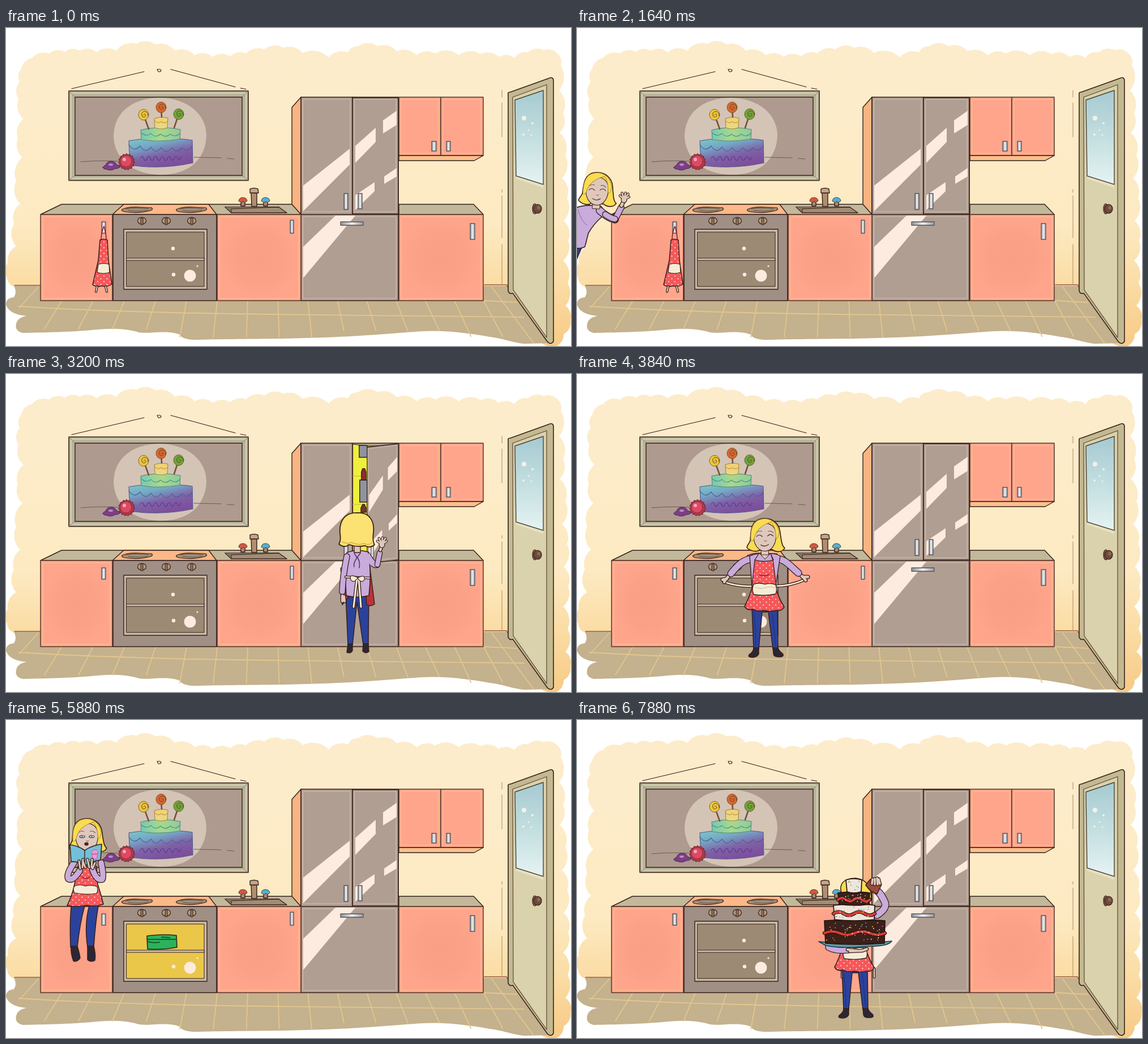
Recreate the animation shown at these times as an HTML page. Size 998 by 561 pixels, loop 8 s.

```html
<!DOCTYPE html>
<html lang="en">
<head>
<meta charset="utf-8">
<title>Kitchen</title>
<style>
html,body{margin:0;width:100%;height:100%;overflow:hidden;background:#fff}
svg{display:block;width:100vw;height:100vh}
</style>
</head>
<body>
<svg id="stage" viewBox="0 0 998 561" stroke-linecap="round" stroke-linejoin="round"></svg>
<script>
const INK = '#38201a', SKIN = '#dfc8bb', LILAC = '#c9abdc', HAIR = '#f9dc50', BLUE = '#2b429c',
  SALMON = '#ffa58c', CREAM = '#f6ecd6', SHINE = '#fdebdf', RED = '#f5585a', SHOE = '#2d2634';

let seed = 7;
const rnd = () => (seed = seed * 16807 % 2147483647) / 2147483647;

// drawing helpers, all return markup
const path = (d, fill = 'none', ink = INK, w = 1.4) =>
  `<path d="${d}" fill="${fill}" stroke="${ink}" stroke-width="${w}"/>`;
const flat = (d, fill) => path(d, fill, 'none', 0);
const oval = (x, y, rx, ry, fill, ink = INK, w = 1.2) =>
  `<ellipse cx="${x}" cy="${y}" rx="${rx}" ry="${ry}" fill="${fill}" stroke="${ink}" stroke-width="${w}"/>`;
const dot = (x, y, r, fill) => oval(x, y, r, r, fill, 'none', 0);
const box = (x1, y1, x2, y2, fill, ink = INK, w = 1.4) =>
  path(`M${x1},${y1}H${x2}V${y2}H${x1}Z`, fill, ink, w);
const limb = (d, color, w) => path(d, 'none', INK, w + 2.6) + path(d, 'none', color, w);
const group = (id, body, hidden) => `<g id="${id}"${hidden ? ' display="none"' : ''}>${body}</g>`;
const at = (x, y, body, more = '') => `<g transform="translate(${x} ${y}) ${more}">${body}</g>`;

function scallop(text) {
  const pts = text.split(' ').map(p => p.split(',').map(Number));
  return pts.map(([x, y], i) => {
    if (!i) return `M${x},${y}`;
    const r = 0.85 * Math.hypot(x - pts[i - 1][0], y - pts[i - 1][1]);
    return `A${r},${r} 0 0 1 ${x},${y}`;
  }).join('') + 'Z';
}

function speckle(n, x1, y1, x2, y2) {
  const colors = ['#e8d34c', '#5fb0d8', '#e46a9c', '#7cc46a', '#f0efe8', '#e07a3a'];
  let s = '';
  for (let i = 0; i < n; i++)
    s += dot(x1 + rnd() * (x2 - x1), y1 + rnd() * (y2 - y1), 1, colors[i % 6]);
  return s;
}

const linear = (id, x2, y2, ...stops) =>
  `<linearGradient id="${id}" x2="${x2}" y2="${y2}">` +
  stops.map((c, i) => `<stop offset="${i / (stops.length - 1)}" stop-color="${c}"/>`).join('') + '</linearGradient>';

const defs = `<defs>
${linear('wall', 0, 1, '#fdeccb', '#fdecca', '#fdebc6', '#fdeac2', '#fbdca4', '#f7ca86')}
${linear('glass', 0, 1, '#a5cad2', '#c3dedf', '#e6f3f3')}
${linear('steel', 1, 0, '#8f9196', '#f1f1f4', '#9a9ca1')}
${linear('rain1', .5, 1, '#7ccbc2', '#74a9c6', '#7f62a6', '#7d4f9c')}
${linear('rain2', 1, 0, '#75c9b4', '#a8d88d', '#8ecb9d')}
${linear('rain3', 0, 1, '#f1cf73', '#e6dc86')}
<radialGradient id="cab"><stop stop-color="#f99f86"/><stop offset=".6" stop-color="#fba188"/><stop offset="1" stop-color="${SALMON}"/></radialGradient>
<pattern id="dots" width="11" height="10" patternUnits="userSpaceOnUse"><rect width="11" height="10" fill="${RED}"/>
<circle cx="2.5" cy="2.5" r="1" fill="#fff"/><circle cx="8" cy="7.5" r="1" fill="#fff"/></pattern></defs>`;

function room() {
  let s = flat(scallop('14,456 2,440 3,415 18,385 14,345 25,310 18,270 29,228 21,195 31,160 22,125 24,95 27,72 46,53 76,45 104,42 130,40 160,43 195,40 230,28 264,29 298,40 333,48 365,51 396,50 424,45 456,38 490,35 524,44 570,52 604,43 622,32 656,32 690,41 725,48 758,45 800,48 838,46 870,51 898,53 922,43 950,39 973,44 980,66 977,110 984,150 978,185 988,225 982,265 991,300 985,340 993,375 984,410 992,450 988,490 997,515 985,540 972,561 930,540'), 'url(#wall)');
  s += flat('M14,455H885L893,468L958,556L915,557C890,554 880,548 855,545C810,537 770,533 735,535C690,538 640,543 560,546C480,549 400,548 340,550Q312,551 307,541C285,532 255,540 235,537C210,530 190,530 160,532C110,537 60,537 30,538Q15,535 18,522Q20,511 36,508Q5,505 0,488Q0,476 14,475Q20,466 14,455Z', '#c4b18d');
  let tiles = 'M22,491Q200,502 460,505T915,510M845,481L902,484M57,457L24,493M858,457L932,556';
  for (let i = 0; i < 15; i++) {
    const x = 98 + i * 53.5 + 8 * Math.sin(i / 4), u = (x - 490) / 400;
    tiles += `M${x},482L${x + u * 34 + 3},${i < 4 ? 531 : i < 9 ? 545 : i < 13 ? 534 : 544}`;
  }
  s += path(tiles, 'none', '#e2c68e', 1.8);
  s += path('M15,454H61M845,453H884L890,462', 'none', '#9c5a38', 1.5);
  s += path('M876,110V122M876,132V192M876,285V290M876,296V370M876,382V452', 'none', '#a98a66', 1);
  return s;
}

function outerDoor() {
  return path('M887,117Q886,113 891,113L958,89Q966,85 967,92V553Q962,560 956,553L895,468Q889,470 887,464Z', '#c3b991', INK, 1.6) +
    path('M895,122L955,100V546L896,462Z', '#dad1ad', '#5b4632', 1.2) +
    path('M899,127L949,110V276L901,261Z', 'url(#glass)', '#4a4438', 1.4) +
    flat('M901,262L949,277V282L901,266Z', '#e8e0c0') +
    [[915, 159, 4.2], [930, 168, 2], [923, 180, 1.5], [914, 188, 2], [928, 189, 1.5]].map(([x, y, r]) => dot(x, y, r, '#f3f0e6')).join('') +
    oval(934, 319, 4, 9, '#8b6a52') + oval(939, 319, 7, 8, '#6e4a3b') + oval(941, 317, 3, 3.5, '#8c6653', 'none');
}

function cabinet(x1, y1, x2, y2, fill = 'url(#cab)') {
  return box(x1, y1, x2, y2, SALMON, '#5a352a', 1.5) + box(x1 + 4, y1 + 4, x2 - 4, y2 - 4, fill, '#fdba90', 1.6);
}
const handle = (x1, y1, x2, y2) => box(x1, y1, x2, y2, 'url(#steel)', '#55565c', 1.3);

function frame() {
  let s = path('M116,107L244,77M291,73L405,104M414,106L424,108M267,73q7,-1 7,2q-1,3 -5,2z', 'none', INK, 1.2);
  s += box(111, 111, 428, 269, '#b7b397', INK, 1.6) + box(115, 115, 424, 265, 'none', '#d0ccb0', 2.5) +
    path('M111,111L122,122M428,111L417,122M111,269L122,260M428,269L417,260', 'none', '#8b856a', 1) +
    box(122, 122, 417, 260, '#ae9a8f', INK, 1.4);
  s += path('M190,192C190,150 222,124 270,123C320,123 354,152 354,190C352,236 318,260 270,259C222,257 192,230 190,192Z', '#d4c4b6', 'none', 0);
  s += path('M132,236Q165,233 198,235M332,228L380,229M391,230L403,231', 'none', '#6f5c55', 1.1);
  s += path('M217,199Q272,190 329,198L330,238Q275,250 219,242Z', 'url(#rain1)', '#55588e', 1.1);
  s += path('M217,206q9,14 20,2q9,15 19,2q9,14 18,1q9,14 19,0q8,12 18,0q8,10 18,-2', 'none', '#4a5f94', 1.2);
  s += path('M237,230q4,-7 6,0q3,8 6,0q4,-7 6,0q3,8 6,0q4,-7 6,0q3,8 6,0q4,-7 6,0q3,8 6,0q4,-7 6,0q3,7 6,0q4,-7 6,0q3,6 6,-3', 'none', '#5a3a8e', 1.2);
  s += path('M238,180Q272,172 308,179L307,196Q272,202 239,197Z', 'url(#rain2)', '#5d8a72', 1.1);
  s += path('M239,185q9,8 17,1q8,9 17,1q9,8 17,0q9,7 17,-1', 'none', '#4d9180', 1.1);
  s += path('M262,160Q274,155 286,159L285,176Q273,180 263,176Z', 'url(#rain3)', '#a78448', 1.1) +
    path('M263,164q6,6 11,1q6,5 11,0', 'none', '#b8862f', 1);
  for (const [x, y, c, dx, dy] of [[243, 153, '#ecc63a', 9, 25], [274, 140, '#d8662f', 1, 17], [305, 152, '#6da53a', -8, 24]])
    s += path(`M${x},${y}l${dx},${dy}`, 'none', '#7a5136', 2.6) + oval(x, y, 9, 9.5, c, '#6a4b25', .8) +
      path(`M${x},${y}q3,-3 4,1q-2,5 -6,2q-4,-6 3,-9q8,1 7,8`, 'none', '#664820', 1);
  s += path('M171,246q3,-4 5,-4q2,-7 10,-7q8,1 9,6q5,1 7,4q-5,4 -9,3q-8,5 -16,1q-4,1 -6,-3z', '#7c3f86', '#4d2754', 1) + oval(185, 241, 4, 2, '#b98cc2', 'none');
  let frill = 'M';
  for (let i = 0; i <= 60; i++) {
    const a = i / 60 * 6.2832, r = 13.5 + Math.sin(a * 15);
    frill += `${213 + r * Math.cos(a)},${236 + r * Math.sin(a)} `;
  }
  return s + path(frill + 'Z', '#b03a48', '#5e1c28', 1) + oval(212, 235, 10, 10, '#dc4a63', '#8a2438', .8) + dot(209, 232, 3, '#f4a9b5');
}

function units() {
  let s = path('M505,140L521,122V329L505,312Z', '#f8b482') + box(521, 122, 693, 481, '#b09e92', INK, 1.6);
  s += path('M525,126H608V324H525Z', 'none', '#d0c0b5', 1) + path('M525,333H689V477H525Z', 'none', '#d0c0b5', 1);
  s += flat('M525,278L607,213V241L525,323Z M582,331H617L525,441V386Z', SHINE);
  s += path('M612,122V329M521,329H693', 'none', INK, 1.6) + handle(597, 292, 604, 320) + handle(591, 342, 631, 348);
  s += cabinet(694, 122, 768, 225, SALMON) + cabinet(768, 122, 843, 225, SALMON) + path('M694,225H843L827,234H694Z', '#fbbf8c') +
    handle(752, 200, 760, 217) + handle(778, 200, 785, 217);
  s += path('M694,311H826L843,329H694Z', '#c2b99b') + cabinet(694, 329, 843, 481) + handle(820, 345, 828, 373);
  s += path('M61,329L98,311H505L521,329Z', '#c2b99b') + path('M188,329L208,311H358L372,329Z', '#fcb887');
  s += cabinet(61, 329, 188, 481) + cabinet(373, 329, 521, 481) + handle(502, 339, 508, 362) + handle(169, 342, 176, 362);
  s += path('M387,316H482L496,326H398Z', '#a08d74') + path('M387,316L398,326V319L482,316', '#857460', INK, 1);
  s += path('M433,291H443V315H434Z', '#b08e72') + path('M431,284q7,-3 14,0l1,7h-15z', '#c5a488');
  for (const [x, c] of [[418, '#d8553f'], [458, '#55aed0']])
    s += box(x - 3, 306, x + 4, 314, '#a78a72') + path(`M${x - 7},305q1,-6 7,-6q7,0 8,6l-4,3l-3,-2l-3,2z`, c, '#4d4038', 1);
  for (const x of [232, 328])
    s += path(`M${x - 27},320q10,-5 30,-4l22,1q4,3 -2,5q-20,6 -46,2q-6,-2 -4,-4z`, '#a39079', INK, 1.1) +
      path(`M${x - 20},319q18,-3 40,0M${x - 16},322q18,2 34,0`, 'none', '#5e4a3c', 1);
  s += box(189, 329, 372, 481, '#a08f85', INK, 1.6);
  for (const x of [240, 283, 328]) s += oval(x, 340, 7.5, 6, '#b59a7e') + box(x - 1.5, 335, x + 2, 347, '#8e7660', INK, 1);
  s += box(208, 355, 355, 461, '#c9baa6', INK, 1.4) + `<rect id="oven" x="213" y="360" width="137" height="96" fill="#9c8a75" stroke="${INK}"/>`;
  return s;
}

function ovenFront() {
  return group('tin', path('M249,381Q275,377 301,380L302,401Q275,406 250,404Z', '#2bb35a', INK, 1.6) +
    path('M249,387H301M275,383l14,1M251,391q10,3 20,1', 'none', '#145c32', 2), 1) +
    group('upperDot', dot(295, 389, 3.2, SHINE)) +
    box(213, 406, 350, 410, '#cdbfae', INK, 1) + dot(296, 435, 3.2, SHINE) + dot(325, 437, 10.5, SHINE) + dot(338, 420, 1.6, SHINE);
}

function fridgeDoor() {
  const inside = path('M613,124L638,127H692V328H613Z', '#eff03c', INK, 1) + path('M613,180H692M613,230H692M613,280H692', 'none', '#c9ca4a', 1.5) +
    box(645, 205, 668, 230, '#6fae62') + path('M627,244v-8l3,-6h3l3,6v8z', '#6e3a2c') + oval(660, 272, 12, 8, '#e38a3f');
  const rack = box(0, 126, 14, 147, '#8d94a0') + box(1, 187, 14, 226, '#8d94a0') + path('M4,187v-14l2,-6h4l2,6v14z', '#8e2c2a');
  const outer = box(612, 123, 693, 328, '#b09e92', INK, 1.6) + path('M616,126H689V324H616Z', 'none', '#d0c0b5', 1) +
    flat('M617,208L653,176V201L617,238ZM666,163L690,146V171L666,186ZM617,295L651,272V288L617,321ZM668,262L690,247V262L668,275Z', SHINE) + handle(622, 292, 629, 319);
  const inner = box(612, 123, 693, 328, '#a7a4a6', INK, 1.6) + box(618, 130, 687, 322, '#c5c6cc') +
    box(618, 150, 687, 172, '#8d94a0') + box(618, 210, 687, 232, '#8d94a0') + box(618, 275, 687, 300, '#8d94a0') + box(640, 192, 650, 212, '#8e2c2a');
  return group('inside', inside, 1) + group('rack', rack, 1) + group('door', group('outer', outer) + group('inner', inner, 1));
}

const hangingApron = path('M168,374q0,-14 5,-24q4,12 4,24', 'none', '#8c1f24', 1.6) +
  path('M166,374Q172,371 179,374L181,410L187,452Q178,458 170,455Q160,458 153,453L163,410Z', 'url(#dots)', INK, 1.5) +
  path('M163,417q10,-3 19,0l1,14q-11,4 -22,0z', CREAM, INK, 1.2) + limb('M161,456l-2,9M176,456l2,9', CREAM, 1.6);

function head(awake) {
  let s = path('M-8,-31C-27,-26 -27,-8 -28,8C-28,17 -37,20 -34,25C-26,32 -14,33 -10,28L14,28C22,34 34,33 38,25C32,21 31,8 29,-6C27,-23 12,-35 -8,-31Z', HAIR, INK, 1.8);
  s += path('M-7,24H7V38H-7Z', SKIN, INK, 1) + path('M-21,-2C-24,18 -12,31 0,31C13,31 23,17 21,-4C19,-18 7,-24 -2,-22Z', SKIN, INK, 1.2);
  s += path('M12,-25C-4,-20 -18,-10 -21,8Q-25,14 -27,11C-28,-8 -25,-26 -8,-30C10,-35 25,-22 27,-4Q25,9 21,6C21,-8 18,-18 12,-25Z', HAIR, '#a8842c', 1);
  s += path('M-16,-5q5,-4 10,-2M6,-7q6,-2 10,3M-1,11q2,2 4,0', 'none', '#7a5a48', 1.1);
  s += awake
    ? group('eyes', oval(-9, 3, 5, 2.2, '#dfe8ea') + oval(9, 3, 5, 2.2, '#dfe8ea') + dot(-9, 3.4, 1.8, '#4d8f9e') + dot(9, 3.4, 1.8, '#4d8f9e')) +
      group('lids', path('M-15,3q6,4 11,0M4,3q5,4 11,0', 'none', INK, 1.4), 1) + group('mouth', oval(-1, 17, 3.4, 2.6, '#5c2023'))
    : path('M-16,3q5,-6 11,0M5,2q5,-6 11,0M-8,19q8,5 15,-1', 'none', INK, 1.2);
  return `<g transform="scale(.92)">${s}</g>`;
}

// legs, shoes and skirt around x = 0
function lower() {
  return path('M-23,414L-20,485H-11L-5,420H6L14,485H23L22,414Z', BLUE, INK, 1.5) + path('M-20,419q4,30 4,60M13,422l6,58', 'none', '#1f2f78', 1) +
    path('M-20,483H-11V494Q-14,500 -22,500Q-31,500 -28,495Q-20,490 -20,483Z', SHOE) + path('M14,483H23Q25,489 31,493Q35,499 26,499Q16,500 15,494Z', SHOE) +
    path('M-21,372Q-28,395 -36,410q5,8 14,5q10,5 20,2q12,3 22,0q10,2 14,-6Q22,392 18,372Z', 'url(#dots)', INK, 1.6);
}
const pocket = path('M-20,371q10,-4 20,0q10,-3 19,1q3,8 0,16q-18,4 -39,1q-4,-9 0,-18z', CREAM, INK, 1.3) + path('M-18,376q9,4 18,1t18,0', 'none', '#c9b99a', 1);
const bib = path('M-27,321Q-14,316 -6,317L0,325L7,317Q18,316 27,321L19,374H-23Z', LILAC) +
  path('M-11,317L-18,328Q-2,333 15,328L10,317L14,328L20,375H-23L-18,328', 'url(#dots)', INK, 1.3) + path('M-8,318L0,327L8,318', SKIN, INK, 1);

function openHand(x, y) {
  const d = `M${x},${y}l-8,-5M${x},${y}l-5,-10M${x},${y}l1,-11M${x},${y}l6,-10M${x},${y}l8,-5`;
  return path(d, 'none', INK, 4.8) + oval(x, y + 1, 5, 5.5, SKIN) + path(d, 'none', SKIN, 2.8);
}

const peek = flat('M0,384L10,386L0,408Z', BLUE) + path('M7,388L0,407', 'none', INK) +
  path('M-4,318Q10,312 26,313L42,314Q50,322 43,334Q30,345 20,362L14,386Q4,391 -4,387Z', LILAC, INK, 1.6) +
  path('M2,320q5,22 16,28', 'none', '#8c6ca8', 1) +
  limb('M40,322Q55,335 67,338', LILAC, 11) + group('wave', limb('M67,338L75,315', LILAC, 9) + limb('M75,312L77,306', SKIN, 5) + openHand(78, 300)) +
  limb('M50,329Q60,336 67,337', LILAC, 9) + at(36, 284, head(), 'rotate(4)');

function wideArm(side) {
  const string = side < 0 ? 'M-72,367Q-45,376 -20,374' : 'M70,363Q45,374 19,374';
  return limb(string, CREAM, 2.6) +
    limb(side < 0 ? 'M-62,354L-68,361l-4,6M-67,361l-8,2' : 'M61,353L67,358l5,6M66,358l10,0', SKIN, 4.4) +
    limb(side < 0 ? 'M-22,326C-38,327 -48,337 -60,352' : 'M22,326C36,327 46,340 59,351', LILAC, 10.5);
}
const wide = lower() + group('armL', wideArm(-1)) + group('armR', wideArm(1)) + bib + path('M-10,354q8,4 17,0', 'none', '#8c1f24') + pocket + at(0, 284, head());

const back = path('M-20,388L-16,478H-8L0,402L11,478H20L21,388Z', BLUE, INK, 1.5) + path('M-16,476H-8V488Q-11,494 -18,491ZM11,476H20L21,490Q15,494 10,489Z', SHOE) +
  path('M-24,335Q-32,385 -26,407L-14,392ZM22,335L31,406Q24,411 17,407L16,392Z', '#b8343a') +
  limb('M18,320Q28,338 35,336', LILAC, 10) + group('pull', limb('M36,336L40,316', LILAC, 8) + limb('M41,311L43,306', SKIN, 4) + openHand(44, 300)) +
  path('M-18,315Q0,308 20,314Q26,350 21,391Q0,396 -19,391Q-22,350 -18,315Z', LILAC, INK, 1.5) +
  limb('M-18,322Q-25,355 -26,384', LILAC, 9) + limb('M-26,391v10M-23,392l1,9', SKIN, 4) +
  flat('M13,320L22,316L29,332L24,338Z', LILAC) + path('M-5,303H6V315H-5Z', SKIN) +
  path('M-5,316l5,8l6,-8M0,324q-7,10 -5,16M1,324q5,8 3,18', 'none', '#4c3560', 1.5) +
  limb('M-20,358L22,360', CREAM, 2) + limb('M0,361l-6,50M3,361l4,50', CREAM, 3) +
  path('M1,359q-16,-8 -12,4q5,7 12,-3q14,-8 12,3q-5,7 -12,-3', CREAM, INK, 1.2) +
  path('M2,245C-22,243 -32,260 -30,282Q-28,294 -32,300Q-22,308 -14,301Q0,306 14,303Q24,308 31,301Q27,295 29,280C31,262 24,244 2,245Z', '#fce173', INK, 1.8) +
  path('M-26,296q10,5 16,1q12,6 22,2q8,4 14,-1', 'none', '#dcae48', 1.6);

const mixing = limb('M-31,412v14M27,412v14', CREAM, 1.8) + lower() + bib + at(-3, 4, pocket) +
  limb('M-23,326Q-32,345 -31,364Q-27,371 -10,369', LILAC, 8.5) +
  group('stir', limb('M-14,308L-9,344', '#2c4170', 2.4)) + oval(-1, 343, 20, 4.5, '#f0dc7c') +
  path('M-24,343Q-1,349 21,343V354L17,357L16,364Q-1,370 -18,365L-19,358L-24,354Z', '#27b65c', INK, 1.6) + path('M-24,354Q-1,362 20,355', 'none', '#12602f', 1.6) +
  limb('M-2,371l10,-1l8,-5M5,374l11,-5', SKIN, 3.6) +
  group('hand', limb('M24,326Q16,331 -1,328', LILAC, 9.5) + limb('M-9,326l-5,2M-9,330l-6,1', SKIN, 4.4)) +
  group('drops', dot(-1, 344, 2.2, '#f3e08a') + dot(3, 351, 2, '#f3e08a') + dot(-26, 340, 1.4, '#f3e08a')) + at(0, 283, head());

function cloud(x, y, rx, ry, n, amp) {
  let d = '';
  for (let i = 0; i <= 180; i++) {
    const a = i / 180 * 6.2832, k = 1 + amp * Math.sin(a * n);
    d += `${i ? 'L' : 'M'}${(x + rx * k * Math.cos(a)).toFixed(1)},${(y + ry * k * Math.sin(a)).toFixed(1)}`;
  }
  return path(d + 'Z', '#fff', INK, 1.5);
}

const sitting = path('M116,322Q112,350 114,401H126Q130,360 139,328H147Q138,360 144,401H155Q158,355 164,322Z', BLUE, INK, 1.5) +
  path('M115,399H126Q130,412 131,420Q125,428 119,425Q114,412 115,399ZM144,399H155Q159,414 157,424Q149,428 144,423Z', SHOE) +
  path('M127,258H160L162,290Q168,308 172,325Q158,330 142,327Q122,331 108,327Q117,310 121,290Z', 'url(#dots)', INK, 1.6) +
  path('M121,293q10,-4 19,0q11,-3 21,1q2,7 -1,12q-20,3 -39,-1q-4,-6 0,-12z', CREAM, INK, 1.2) + path('M134,277q8,5 14,0', 'none', '#8c1f24') +
  limb('M120,252Q106,272 110,280Q118,285 130,266', LILAC, 9.5) + limb('M168,252Q173,275 170,281Q160,284 153,264', LILAC, 9.5) +
  at(143, 203, head(true)) + path('M113,220Q128,222 139,230Q152,221 169,219L167,247Q150,249 140,257Q128,249 115,250Z', '#72c0d8', INK, 1.6) +
  path('M139,230V256', 'none', INK) + path('M151,236q0,-6 6,-7q6,0 6,6zM152,237h10l-2,8h-6z', '#f09ad2', '#c35aa5', 1) +
  limb('M131,262l-2,-13M135,260l1,-14M140,260l-4,-10M147,260l-3,-14M151,260l1,-14M153,262l4,-10', SKIN, 3);

function tier(x1, y1, x2, y2, fill, n) {
  const m = (y1 + y2) / 2 + 2, w = (x2 - x1) / 4;
  const wave = `M${x1},${m}q${w / 2},-6 ${w},0t${w},0t${w},0t${w},0`;
  return path(`M${x1},${y1}Q${(x1 + x2) / 2},${y1 - 4} ${x2},${y1}L${x2 - 1},${y2}Q${(x1 + x2) / 2},${y2 + 4} ${x1 + 2},${y2}Z`, fill, '#231210', 1.7) +
    (n > 20 ? path(wave, 'none', '#231210', 6.4) + path(wave, 'none', '#d93a35', 4.2) : '') + speckle(n, x1 + 4, y1 + 2, x2 - 4, y2 - 3);
}
const serving = limb('M468,438v16M525,438v16', CREAM, 1.8) + at(491, 26, lower() + at(1, 6, pocket)) +
  path('M466,300Q464,280 492,279Q520,282 520,316Q500,330 470,322Z', HAIR, INK, 1.6) +
  limb('M444,401Q456,408 478,406', LILAC, 9) + limb('M478,405l16,2M482,408l22,-1l8,-3', SKIN, 4) +
  limb('M530,344Q548,332 544,322Q538,308 531,302', LILAC, 11) +
  path('M427,391Q490,397 556,390Q550,399 520,399Q470,404 440,398Z', '#5f9da8', '#1d3b42', 1.6) +
  tier(437, 354, 544, 394, '#3c201a', 48) + tier(453, 327, 526, 352, '#eee5dd', 30) + tier(461, 305, 517, 325, '#3c201a', 22) +
  tier(475, 282, 503, 303, '#eee5dd', 12) +
  group('jar', path('M510,291L518,281L538,290L530,307Q518,304 510,291Z', '#9c4a3c', INK, 1.6) +
    limb('M521,289l1,-8M526,290l0,-10M531,290l-1,-11M535,289l-2,-8', SKIN, 3.6)) +
  group('shower', speckle(26, 405, 300, 555, 470), 1);

const stage = document.getElementById('stage');
stage.innerHTML = defs + room() + outerDoor() + frame() + units() + ovenFront() + fridgeDoor() +
  group('apron', hangingApron) + group('peek', peek) + group('wide', wide) + group('back', back) + group('mixing', mixing) +
  group('puff1', cloud(282, 291, 8, 6, 5, .12)) + group('puff2', cloud(262, 273, 11.5, 9.5, 6, .1)) +
  group('thought', cloud(272, 187, 73, 65, 17, .026)) + group('sitting', sitting) + group('serving', serving);

const el = {};
stage.querySelectorAll('g[id], rect[id]').forEach(n => el[n.id] = n);
const show = (id, on) => el[id].setAttribute('display', on ? 'inline' : 'none');
const move = (id, t) => el[id].setAttribute('transform', t);
const clamp = v => Math.max(0, Math.min(1, v));
const within = (t, a, b) => t >= a && t < b;
const ease = v => 1 - (1 - clamp(v)) ** 3;

function swingDoor(edge) {
  const s = (693 - edge) / 81, open = edge > 612, skew = open ? -6 / 81 : 0;
  move('door', `matrix(${s} ${skew} 0 1 ${693 * (1 - s)} ${-693 * skew})`);
  move('rack', `translate(${edge - 14} 0)`);
  show('inside', open);
  show('rack', s > .1 && edge > 626);
  show('outer', s > 0);
  show('inner', s <= 0);
}

function draw(ms) {
  const t = Math.floor(ms / 40) * 40, q = Math.floor(ms / 80) * 80;

  show('apron', t < 1800);
  show('peek', within(t, 80, 1800));
  move('peek', `translate(${-100 * (1 - ease((t - 40) / 560))} 0)`);
  move('wave', `rotate(${16 * Math.sin((t - 960) / 480 * 6.2832)} 67 338)`);

  // standing with arms spread, then hopping along the counter
  show('wide', within(t, 1800, 3040) || within(t, 3840, 4000));
  const stand = t >= 3840 ? 332 : t >= 2880 ? 440 : t >= 2800 ? 330 : t >= 2720 ? 200 : 83 - 60 * (1 - ease((t - 1760) / 360));
  move('wide', `translate(${stand} 0)`);
  const tug = within(t, 2320, 2360) ? 5 : within(t, 2360, 2440) ? 10 : 0;
  move('armL', `rotate(${tug} -22 326)`);
  move('armR', `rotate(${-tug} 22 326)`);

  // fridge, then the oven, seen from behind
  const atOven = within(t, 5120, 5440);
  show('back', within(t, 3040, 3840) || atOven);
  move('back', atOven ? 'translate(300 20)' : 'translate(620 0)');
  const reach = atOven ? 0 : clamp((q - 3200) / 320);
  move('pull', `rotate(${reach * 28} 36 336)`);
  swingDoor(within(t, 3120, 3760) ? 612 + 209 * clamp((q - 3120) / 400) ** 1.3 : within(t, 3760, 3840) ? 700 : 612);

  // mixing and the thought bubble
  show('mixing', within(t, 4000, 5120));
  move('mixing', 'translate(330 0)');
  const stir = within(t, 4160, 5040) ? Math.sin((q - 4800) / 320 * 6.2832) : 0;
  move('stir', `translate(${4 * stir} 0)`);
  move('hand', `translate(${4 * stir} ${-Math.abs(stir)})`);
  move('drops', `translate(${3 * stir} ${-5 * Math.abs(stir)})`);
  show('puff1', within(t, 4160, 5040));
  show('puff2', within(t, 4240, 5040));
  show('thought', within(t, 4320, 5040));
  const grow = q < 4480 ? .4 + .8 * (q - 4320) / 160 : 1.2 - .2 * clamp((q - 4480) / 160);
  move('thought', `translate(285 290) scale(${grow}) translate(-285 -290)`);

  // baking while reading
  const lit = within(t, 5280, 6360);
  const flicker = within(t, 5960, 6200) && q % 160 === 0;
  el.oven.setAttribute('fill', !lit ? '#9c8a75' : flicker ? '#f4d466' : '#eac748');
  show('tin', lit);
  show('upperDot', !lit);
  show('sitting', within(t, 5440, 6360));
  const blink = within(t, 5960, 6040) || within(t, 5600, 5680);
  show('eyes', !blink);
  show('lids', blink);
  move('mouth', within(t, 6040, 6200) ? 'translate(0 9) scale(1 .45)' : '');

  // decorating: two quick shakes, then a rest
  show('serving', t >= 6440);
  const beat = t >= 6760 ? Math.floor((t - 6760) % 320 / 80) : 3;
  move('jar', ['rotate(10 530 300) translate(2 -3)', 'translate(-6 3) rotate(-16 530 300)'][beat] || '');
  show('shower', beat < 2);
  move('shower', `translate(0 ${beat ? 10 : -18})`);
}

function tick() {
  draw(performance.now() % 8000);
  requestAnimationFrame(tick);
}
tick();
</script>
</body>
</html>
```
